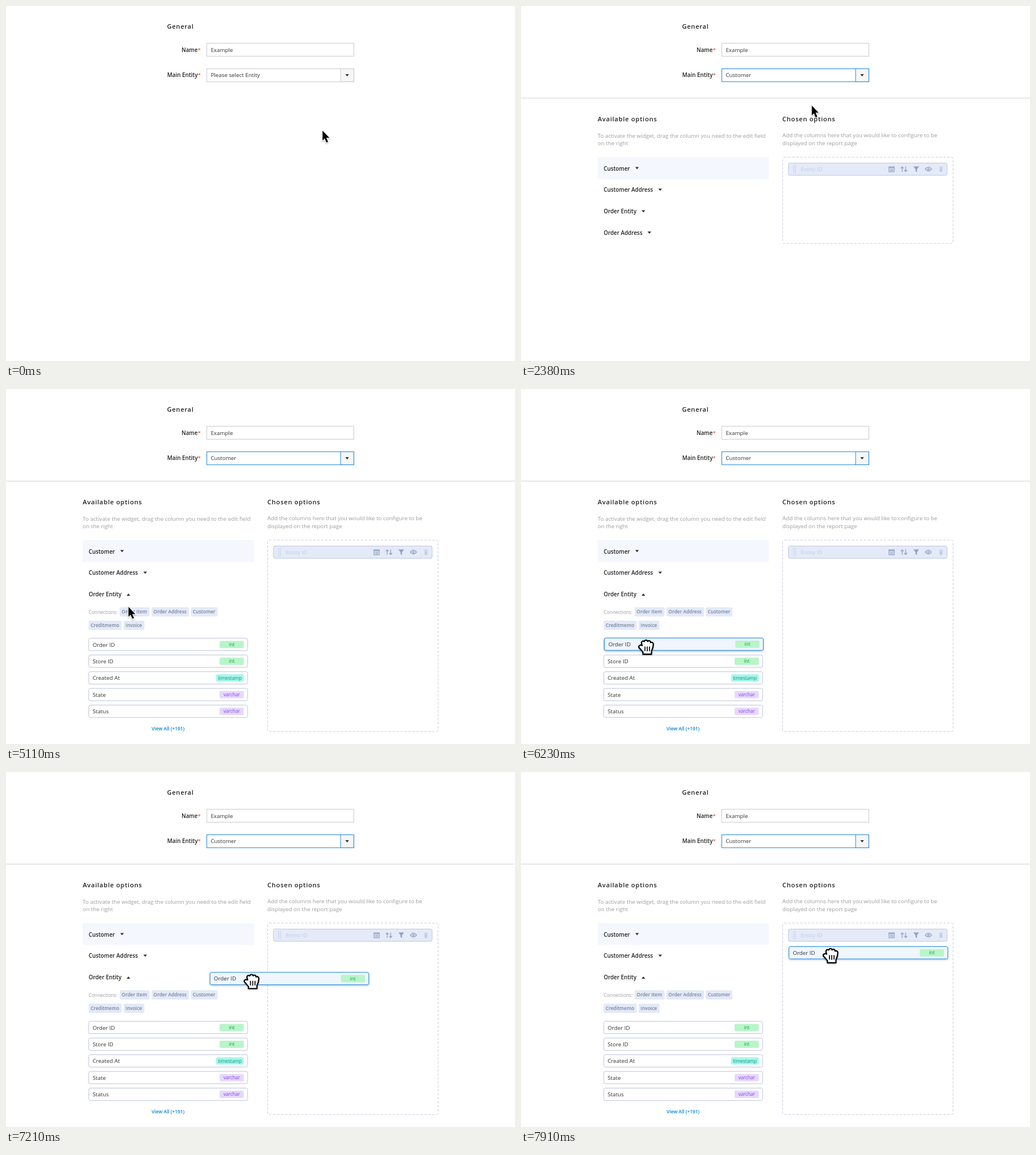
Animation of 896 by 625 pixels, one loop 8000 ms. Source, as an HTML page:

```html
<!DOCTYPE html>
<html lang="en">
<head>
<meta charset="utf-8">
<title>Report columns</title>
<style>
  html, body { margin: 0; width: 100%; height: 100%; overflow: hidden; background: #fff; }
  svg { display: block; width: 896px; height: 625px; }
  text { font: 9.8px "Open Sans", sans-serif; fill: #333; white-space: pre; }
  .label { font-weight: 600; fill: #222; }
  .title { font-size: 11.2px; font-weight: 600; letter-spacing: .7px; fill: #222; }
  .hint { fill: #9c9c9c; }
  .star { fill: #e8401c; }
  .small, .tag, .link, .type { font-size: 8.4px; }
  .small { fill: #9c9c9c; }
  .tag { font-weight: 600; fill: #76809b; }
  .link { font-weight: 600; fill: #0084d8; }
  .type { text-anchor: middle; }
  .faint { fill: #c2cbe2; }
  .icon { fill: none; stroke: #93a0c0; stroke-width: 1.3; }
</style>
</head>
<body>
<svg id="stage" viewBox="0 0 896 625">
  <defs>
    <filter id="soft" x="-50%" y="-50%" width="200%" height="200%">
      <feDropShadow dx="0" dy="1.2" stdDeviation="1.1" flood-opacity=".35"/>
    </filter>
    <filter id="lift" x="-5%" y="-50%" width="110%" height="200%">
      <feDropShadow dx="0" dy="1.4" stdDeviation="1.6" flood-color="#1c4f8c" flood-opacity=".3"/>
    </filter>
  </defs>
  <g id="form"></g>
  <g id="empty"></g>
  <g id="panel"></g>
  <g id="closed"></g>
  <g id="open"></g>
  <g id="card" filter="url(#lift)"></g>
  <g id="arrow" filter="url(#soft)">
    <path d="M1.2 2.4V19.8L5 16.2L8 23.4L10.9 22.1L7.9 15.1H13.2Z" stroke="#fff" stroke-width="2"/>
    <path d="M1.2 2.4V19.8L5 16.2L8 23.4L10.9 22.1L7.9 15.1H13.2Z"/>
  </g>
  <g id="hand" filter="url(#soft)" stroke="#000" stroke-width="2.2" stroke-linejoin="round" stroke-linecap="round">
    <path fill="#fff" d="M-7 -2.8L-8 -6.5C-9 -10.2 -5 -12 -3.3 -9.8C-2.5 -13.2 2 -13.2 2.6 -10C4 -12.2 8 -11.4 7.8 -8C10 -9.5 13 -8 12.6 -4.8C12.6 0 11.6 3 9.4 6.8V12.4H-5.6V8.8C-7.8 6.4 -9.6 3.6 -12 1.4C-14.6 -2 -10.5 -4.8 -7 -2.8Z"/>
    <path fill="none" stroke-width="1.7" d="M-2 -.5V6.2M2 -.5V6.6M6 -.5V6.2"/>
  </g>
</svg>
<script>
const $ = id => document.getElementById(id);

const text = (x, y, s, cls = '') => `<text x="${x}" y="${y}" class="${cls}">${s}</text>`;
const box = (x, y, w, h, fill, stroke = 'none', r = 0, more = '') =>
  `<rect x="${x}" y="${y}" width="${w}" height="${h}" rx="${r}" fill="${fill}" stroke="${stroke}" ${more}/>`;
const caret = (x, y, up) =>
  `<path d="M${x - 3.2} ${y + (up ? 2 : -2)}h6.4l-3.2 ${up ? -4 : 4}z" fill="#333"/>`;
const tag = (x, y, w, s) => box(x, y, w, 16.4, '#e3e9f7', 'none', 2) + text(x + 3.4, y + 11.1, s, 'tag');

const types = {
  int: ['#b9f5c9', '#12a244', 42.6],
  timestamp: ['#a5f7ea', '#0b9485', 48.8],
  varchar: ['#e6d8fd', '#8a3fe0', 42.6]
};
function row(y, name, type, fill = '#fff', stroke = '#bcc3dc') {
  const [bg, ink, w] = types[type];
  return box(145.7, y, 279.6, 21.8, fill, stroke, 2.8) + text(152.4, y + 14.6, name) +
    box(418.6 - w, y + 4.6, w, 12.8, bg, 'none', 2) +
    `<text x="${418.6 - w / 2}" y="${y + 13.9}" class="type" style="fill:${ink}">${type}</text>`;
}

function select(value, line, focus) {
  return box(353.5, 110.5, 258.8, 22.8, '#fff', line) +
    box(589, 110.5, 23.3, 22.8, '#f6f6f6', line) +
    text(360.4, 125.4, value) + caret(600.5, 122);
}
const dropZone = h => box(460.5, 266, 300, h, 'none', '#c8cae0', 3, 'stroke-dasharray="4.2 2.8"');

function icons() {
  let dots = '';
  for (let i = 0; i < 12; i++)
    dots += box(479.4 + (i % 2) * 3, 280.4 + (i >> 1) * 2.5, 1.4, 1.4, '#c2cbe2');
  return dots + `<g class="icon">
    <path d="M647.8 283.2h9.2v8.6h-9.2zM647.8 284.6h9.2M649.8 287.3h5.4M649.8 289.6h5.4"/>
    <path d="M671 292V283.2M668.4 285.8l2.6-2.7 2.6 2.7M677.2 282.6v8.8M674.6 288.8l2.6 2.7 2.6-2.7"/>
    <path d="M711.8 287.2q5.4-7 10.8 0q-5.4 7-10.8 0z"/>
    <circle cx="717.2" cy="287.2" r="1.4"/>
  </g>
  <path d="M690.8 282.4h10l-3.7 4.8v5l-2.6-1.4v-3.6z" fill="#93a0c0"/>
  <path d="M736 283.6h6.4v1.2h-6.4zM738 282.4h2.4v1h-2.4zM736.6 285.6h5.2l-.5 6.6h-4.2z" fill="#c2cbe2"/>`;
}

$('form').innerHTML = text(283.4, 40.4, 'General', 'title') +
  text(309, 80.6, 'Name', 'label') + text(337.6, 80.6, '*', 'star') +
  text(283.8, 125.4, 'Main Entity', 'label') + text(337.6, 125.4, '*', 'star') +
  box(353.5, 65.6, 258.8, 22.8, '#fff', '#c9c9c9') + text(360.4, 80.6, 'Example');

$('empty').innerHTML = select('Please select Entity', '#c9c9c9');

$('panel').innerHTML = select('Customer', '#1b87d9') +
  box(0, 161.6, 896, 1, '#cfcfcf') +
  text(135, 203, 'Available options', 'title') +
  text(135, 232, 'To activate the widget, drag the column you need to the edit field', 'hint') +
  text(135, 245.3, 'on the right', 'hint') +
  text(460, 203, 'Chosen options', 'title') +
  text(460, 231.2, 'Add the columns here that you would like to configure to be', 'hint') +
  text(460, 244.5, 'displayed on the report page', 'hint') +
  box(135, 266, 301, 38.5, '#f5f7fe') +
  text(145.5, 289.5, 'Customer', 'label') + caret(204.3, 285.6) +
  text(145.5, 327.4, 'Customer Address', 'label') + caret(245, 323.4) +
  text(145.5, 365.3, 'Order Entity', 'label') +
  box(470.7, 276.5, 279.4, 21.6, '#e4eaf8', '#bcc5de', 2.8) +
  text(492.4, 290.8, 'Entity ID', 'faint') + icons();

$('closed').innerHTML = caret(215.5, 361.4) +
  text(145.5, 403.1, 'Order Address', 'label') + caret(226, 399) + dropZone(152);

const columns = [['Order ID', 'int'], ['Store ID', 'int'], ['Created At', 'timestamp'],
  ['State', 'varchar'], ['Status', 'varchar']];
$('open').innerHTML = caret(215.5, 362, true) +
  text(145.5, 395.6, 'Connections:', 'small') +
  tag(200.2, 384.2, 52.4, 'Order Item') + tag(256.2, 384.2, 65.8, 'Order Address') +
  tag(325.4, 384.2, 46.8, 'Customer') +
  tag(145.5, 407.8, 58, 'Creditmemo') + tag(207.2, 407.8, 36.4, 'Invoice') +
  columns.map(([name, type], i) => row(438.9 + i * 29.4, name, type)).join('') +
  text(256.2, 601, 'View All (+191)', 'link') + dropZone(337);

$('card').innerHTML = row(438.9, 'Order ID', 'int', '#f0f5fe', '#1b87d9');

const sine = u => (1 - Math.cos(Math.PI * u)) / 2;
// Speeds up over the share d of the time, then keeps its speed.
const rampUp = d => u => (u < d ? u * u / (2 * d) : u - d / 2) / (1 - d / 2);

// start, end, from, to, easing
const moves = [
  [0, 630, [556, 217], [596.6, 119], u => u],
  [1610, 3640, [596.6, 119], [214.4, 358], rampUp(.4)],
  [4760, 5670, [214.4, 358], [214.4, 442], rampUp(.3)]
];
const progress = (t, a, b) => Math.min(1, Math.max(0, (t - a) / (b - a)));

const show = (id, on) => $(id).style.display = on ? '' : 'none';
const place = (id, x, y) => $(id).setAttribute('transform', `translate(${x} ${y})`);

function draw(now) {
  const t = Math.min(7910, Math.floor(now % 8000 / 70) * 70);
  const dragging = t >= 5740;
  show('empty', t < 1190);
  show('panel', t >= 1190);
  show('closed', t >= 1190 && t < 4550);
  show('open', t >= 4550);
  show('arrow', !dragging);
  show('card', dragging);
  show('hand', dragging);

  const [a, b, from, to, ease] = moves.filter(m => t >= m[0]).pop();
  const p = ease(progress(t, a, b));
  place('arrow', ...from.map((v, i) => v + (to[i] - v) * p));

  const q = sine(progress(t, 6160, 7910));
  place('card', 326 * q, -131.6 * q);
  place('hand', 219 + 326 * q, 455 - 131.6 * q);
}

let start;
function tick(now) {
  start ??= now;
  draw(now - start);
  requestAnimationFrame(tick);
}
draw(0);
requestAnimationFrame(tick);
</script>
</body>
</html>
```
